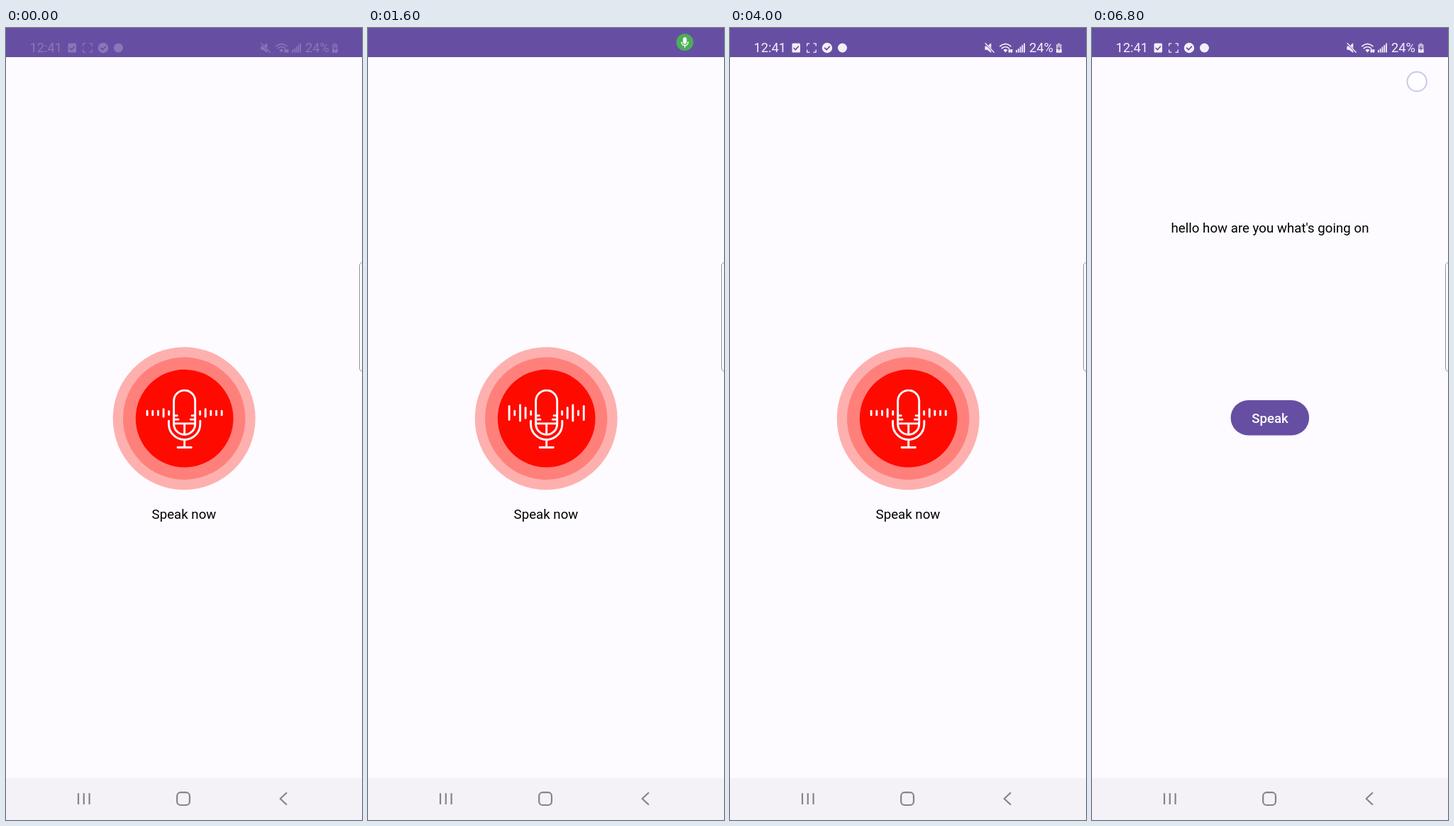
An HTML page that plays this animation: 502 by 1115 pixels, repeating every 6900 ms.

```html
<!DOCTYPE html>
<html lang="en">
<head>
<meta charset="utf-8">
<title>Speak now</title>
<style>
  html, body { margin: 0; width: 100%; height: 100%; overflow: hidden; background: #fdfbff; }
  svg { display: block; width: 502px; height: 1115px; font-family: Roboto, sans-serif; font-size: 18.7px; }
  .line { fill: none; stroke-linecap: round; stroke-linejoin: round; }
  .mid { text-anchor: middle; }
</style>
</head>
<body>
<svg viewBox="0 0 502 1115">
  <rect width="502" height="1115" fill="#fdfbff"/>
  <rect width="502" height="41" fill="#664fa3"/>

  <g id="status" fill="#f3f0f8" stroke="#f3f0f8" stroke-width="0">
    <g font-size="18.3">
      <text x="33.5" y="34.3">12:41</text>
      <text x="422" y="34.3">24%</text>
    </g>
    <rect x="87.5" y="21.5" width="11.5" height="13" rx="1.5"/>
    <path class="line" d="M90 28.3l2.3 2.3 4.2-4.6" stroke="#664fa3" stroke-width="1.6"/>
    <path class="line" d="M108.7 25v-3.2h3.2M118 21.8h3.2V25M121.2 31v3.2H118M111.9 34.2h-3.2V31" stroke-width="1.3"/>
    <path id="camera" class="line" d="M111.8 25.6h4.4v5h-4.4zM116.2 27.4l2.4-1.4v4.2l-2.4-1.4" stroke-width="1.2"/>
    <circle cx="137" cy="28" r="7.2"/>
    <path class="line" d="M133.6 28.2l2.5 2.5 4.4-4.6" stroke="#664fa3" stroke-width="1.7"/>
    <circle cx="158.5" cy="28" r="6.5"/>
    <path d="M359.5 25.5h3.2l5.6-4.2v13.6l-5.6-4.2h-3.2z"/>
    <path class="line" d="M360 21.8l12 12.4" stroke="#664fa3" stroke-width="2.6"/>
    <path class="line" d="M360 21.5l12.2 12.8" stroke-width="1.3"/>
    <path class="line" d="M380.8 25.7q7.6-6.6 15.2 0M383.3 28.7q5.1-4.4 10.2 0" stroke-width="1.6"/>
    <path d="M385.4 31q3-2.4 6 0l-3 3.4zM392.6 31l1.4-2 1.4 2v3.5h-2.8zM395.6 30v3.4l1.4 1.8 1.4-1.8V30z"/>
    <path d="M403 31h1.8v3.5H403zM405.8 29h1.8v5.5h-1.8zM408.6 26.5h1.8v8h-1.8zM411.4 24h1.8v10.5h-1.8zM414.2 21.5h1.8v13h-1.8z"/>
    <path d="M462 21.6h3.6V23h2v11.6H460V23h2z" opacity=".65"/>
    <path d="M460 30h7.6v4.6H460z"/>
    <path d="M464.6 24.5l-3 4.7h2l-.6 3.8 3.2-4.8h-2.2z" fill="#664fa3"/>
  </g>

  <g id="chip">
    <circle r="12" fill="#4cae58"/>
    <rect x="-2.6" y="-7" width="5.2" height="9.4" rx="2.6" fill="#fff"/>
    <path class="line" d="M-4.6 0a4.6 4.6 0 0 0 9.2 0M0 4.6V7" stroke="#fff" stroke-width="1.5"/>
  </g>

  <g id="listen">
    <circle id="outer" cx="251.2" cy="549.7" fill="#feb0af"/>
    <circle id="middle" cx="251.2" cy="549.7" fill="#ff807b"/>
    <circle id="inner" cx="251.7" cy="549.7" fill="#ff0a00"/>
    <g id="mic" class="line" stroke="#fff" stroke-width="3">
      <path d="M-15.6 8V-25.5a15.6 15.6 0 0 1 31.2 0V8a15.6 15.6 0 0 1-31.2 0zM-15.6 7.5h31.2M0 7.5V23"/>
      <path d="M-15-4.2h4.2M-15 1.5h6M15-4.2h-4.2M15 1.5h-6"/>
      <path d="M-23 3.5V8a23 23 0 0 0 46 0V3.5M0 31V42M-10 42.3h20"/>
      <path id="bars"/>
    </g>
    <text class="mid" x="251" y="691">Speak now</text>
  </g>

  <g id="result">
    <text class="mid" x="251" y="288">hello how are you what's going on</text>
    <rect x="195.6" y="524" width="110.6" height="49.4" rx="24.7" fill="#664fa3"/>
    <text class="mid" x="251" y="556" font-weight="500" fill="#fff">Speak</text>
    <circle id="touch" cx="458.2" cy="75.4" r="13.7" fill="#fefdff" stroke="#cbc7ec" stroke-width="2"/>
  </g>

  <rect x="498.5" y="330" width="20" height="153.5" rx="4.5" fill="#fbfafc" stroke="#929295"/>

  <rect y="1056" width="502" height="59" fill="#f4f2f6"/>
  <g class="line" stroke="#858488" stroke-width="2.2">
    <path d="M102 1077.3v15.6M109.8 1077.3v15.6M117.6 1077.3v15.6" stroke-linecap="butt"/>
    <rect x="241.2" y="1076.2" width="17.8" height="17.8" rx="5"/>
    <path d="M395.3 1077l-8.6 8 8.6 8"/>
  </g>
</svg>
<script>
const LOOP = 6900, STEP = 100, PULSE = 2000 / 3;
const el = id => document.getElementById(id);
const set = (id, name, value) => el(id).setAttribute(name, value);
const show = (id, on) => set(id, 'opacity', +on);
const ramp = (t, a, b) => Math.min(1, Math.max(0, (t - a) / (b - a)));
const ease = x => x * x * (3 - 2 * x);

// Sound bars, outermost first: distance from the middle and height at each phase
const phases = [0, 67, 267, 500, 600, PULSE];
const bars = [
  [54.6, 9, 12, 23, 16, 9],
  [46.6, 9, 24, 9, 28, 17],
  [38.6, 9, 42, 26, 31, 13],
  [30.7, 14, 34, 18, 21, 12],
  [22.8, 8, 10, 8, 10, 8]
];

function barPath(p) {
  const i = phases.findIndex((_, k) => p < phases[k + 1]);
  const mix = ramp(p, phases[i], phases[i + 1]);
  return bars.map(([x, ...h]) => {
    const len = h[i] + (h[(i + 1) % h.length] - h[i]) * mix - 3;
    const stroke = side => `M${side * x} ${-8 - len / 2}v${len}`;
    return stroke(-1) + stroke(1);
  }).join('');
}

function draw(t) {
  const listening = t < 4600;
  show('listen', listening);
  show('result', !listening);

  const p = t % PULSE;
  const grow = 2.2 * Math.cos((p - 133) / PULSE * 2 * Math.PI);
  const inner = 69.5 - grow * .95;
  set('outer', 'r', 99.8 + grow);
  set('middle', 'r', 85.9 + grow * .47);
  set('inner', 'r', inner);
  set('mic', 'transform', `translate(251.7 549.7) scale(${inner / 71.5})`);
  set('bars', 'd', barPath(p));

  set('status', 'opacity', t < 100 ? .25 : ramp(t, 2100, 2400));
  show('camera', t % 1000 >= 300 && t % 1000 < 800);

  const enter = ease(ramp(t, 0, 400)), leave = ease(ramp(t, 1700, 2100));
  set('chip', 'opacity', enter * (1 - leave));
  set('chip', 'transform', `translate(${446.8 + 36 * (1 - enter) + 28 * leave} 20)`);

  set('touch', 'opacity', ramp(t, 6600, 6800));
}

function tick(now) {
  draw(Math.floor(now % LOOP / STEP) * STEP);
  requestAnimationFrame(tick);
}
draw(0);
requestAnimationFrame(tick);
</script>
</body>
</html>
```
